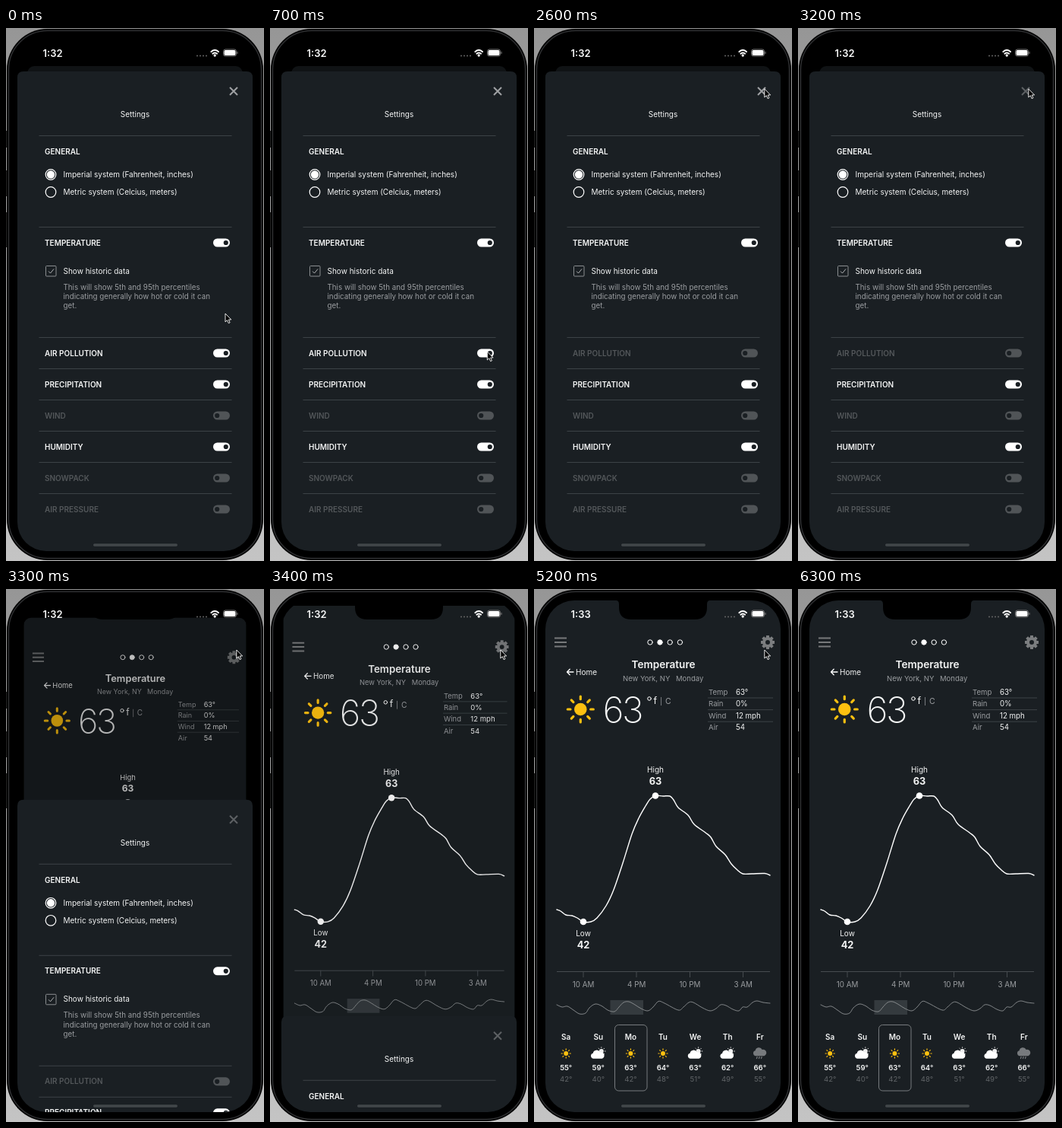
Write an HTML page that moves like this. It is 340 px wide and 700 px high and loops after 6700 ms.

```html
<!DOCTYPE html>
<html lang="en">
<head>
<meta charset="utf-8">
<title>Weather settings</title>
<style>
  html, body { margin: 0; width: 100%; height: 100%; overflow: hidden; background: #aaa; }
  svg { display: block; width: 340px; height: 700px; }
  text { font: 400 10px Inter, "Open Sans", sans-serif; fill: #f4f5f5; }
  .bold { font-weight: 700; }
  .semi { font-weight: 600; }
  .mid { text-anchor: middle; }
  .grey { fill: #9a9da0; }
  .faint { fill: #606467; }
  .rule { stroke: #3c4246; }
  .line { fill: none; stroke: #fff; stroke-linejoin: round; stroke-linecap: round; }
  .panel { fill: #1a1f23; }
  .pill { fill: #fff; }
  .knob { fill: #1a1f23; }
  .off text { fill: #53575a; }
  .off .pill { fill: #505457; }
  .off .knob { transform: translateX(-11.6px); }
</style>
</head>
<body>
<svg viewBox="0 0 340 700">
  <defs>
    <linearGradient id="wall" x2="0" y2="1">
      <stop stop-color="#969696"/><stop offset="1" stop-color="#c4c4c4"/>
    </linearGradient>
    <clipPath id="screen"><rect x="15" y="15" width="310" height="672" rx="38"/></clipPath>
    <g id="sun" stroke="#fdc010" stroke-width="3.2" stroke-linecap="round"></g>
    <path id="cloud" d="M-5 5.2a3.2 3.2 0 0 1-.6-6.300a4.300 4.300 0 0 1 8.200-1.100a3.800 3.800 0 0 1 2.400 7.400z"/>
  </defs>
  <rect width="340" height="700" fill="url(#wall)"/>
  <path d="M.7 135v22M.7 187v34M.7 242v46" stroke="#222" stroke-width="2"/>
  <rect x="1" y="1" width="338" height="698" rx="54"/>
  <rect x="3.500" y="3.500" width="333" height="693" rx="51" fill="none" stroke="#2e2f31" stroke-width="1.500"/>

  <g clip-path="url(#screen)">
    <g id="main"></g>
    <rect id="shade" x="15" y="15" width="310" height="672"/>
    <g id="modal"></g>
    <path d="M108 15q4 0 4 5v4q0 16 16 16h84q16 0 16-16v-4q0-5 4-5z"/>
  </g>

  <text id="clock" class="semi" x="48.500" y="37.500" style="font-size:13px">1:32</text>
  <path d="M252 36.500h14" stroke="#666" stroke-width="2" stroke-linecap="round" stroke-dasharray="0 4"/>
  <g class="line" stroke-width="1.900">
    <path d="M270.300 31.200q4.900-4.400 9.800 0M272.300 33.700q2.900-2.600 5.800 0"/>
    <circle cx="275.200" cy="36" r=".7"/>
  </g>
  <rect x="286.500" y="28" width="17" height="9" rx="2.700" fill="none" stroke="#777"/>
  <rect x="287.500" y="29" width="15" height="7" rx="1.800" fill="#fff"/>
  <path d="M305 31v3" stroke="#777"/>
  <rect x="115" y="677.300" width="111" height="3.500" rx="1.700" fill="#42474a"/>

  <circle id="touch" r="16.500" fill="#aaa" fill-opacity=".4"/>
  <path id="cursor" d="M0 0V11L2.500 8.700 4.300 12.700 6.100 11.900 4.400 8H7.800Z" fill="#000" stroke="#fff" stroke-width=".9" stroke-linejoin="round"/>
</svg>
<script>
const $ = id => document.getElementById(id);
const text = (x, y, s, cls = '', size = 10) =>
  `<text x="${x}" y="${y}" class="${cls}" style="font-size:${size}px">${s}</text>`;
const rule = (y, x1 = 43.5, x2 = 297.5) => `<path class="rule" d="M${x1} ${y}H${x2}"/>`;
const use = (id, x, y, scale, fill = '') =>
  `<use href="#${id}" fill="${fill}" transform="translate(${x} ${y}) scale(${scale})"/>`;
const spokes = (n, r1, r2) => Array.from({ length: n }, (_, i) => {
  const c = Math.cos(i * 2 * Math.PI / n), s = Math.sin(i * 2 * Math.PI / n);
  return `M${c * r1} ${s * r1}L${c * r2} ${s * r2}`;
}).join('');

// Catmull-Rom spline through a flat list of x, y values
function curve(v) {
  const n = v.length / 2;
  const at = i => { i = Math.max(0, Math.min(n - 1, i)); return [v[2 * i], v[2 * i + 1]]; };
  let d = `M${at(0)}`;
  for (let i = 0; i < n - 1; i++) {
    const [a, b, c, e] = [at(i - 1), at(i), at(i + 1), at(i + 2)];
    d += `C${b.map((p, k) => p + (c[k] - a[k]) / 6)} ${c.map((p, k) => p - (e[k] - b[k]) / 6)} ${c}`;
  }
  return d;
}

$('sun').innerHTML = `<circle r="8.300" fill="#fdc010" stroke="none"/><path d="${spokes(8, 13.3, 17)}"/>`;

// Settings sheet
const section = (name, y, on, id = '') => `<g id="${id}" class="${on ? '' : 'off'}">
  ${text(51, y + 3.6, name, 'semi')}
  <rect class="pill" x="273" y="${y - 5.5}" width="22" height="11" rx="5.500"/>
  <circle class="knob" cx="289.800" cy="${y}" r="3.100"/></g>`;

$('modal').innerHTML = `
  <path class="panel" d="M15 760V65q0-8 8-8H317q8 0 8 8V760z"/>
  <path id="close" d="M295 78l10 10m0-10l-10 10" stroke="#9fa1a3" stroke-width="2"/>
  ${text(170, 117, 'Settings', 'mid')}
  ${[141.5, 261.5, 406.5, 447.5, 488.5, 529.5, 570.5, 611.5].map(y => rule(y)).join('')}
  ${text(51, 166, 'GENERAL', 'semi')}
  <g class="line" stroke-width="1.200">
    <circle cx="59" cy="192.500" r="6.800"/><circle cx="59" cy="215.500" r="6.800"/>
  </g>
  <circle cx="59" cy="192.500" r="5.200" fill="#fff"/>
  ${text(75.5, 196.1, 'Imperial system (Fahrenheit, inches)')}
  ${text(75.5, 219.1, 'Metric system (Celcius, meters)')}
  <g fill="none" stroke="#8b8e91">
    <rect x="52.500" y="312.500" width="13.500" height="13.500" rx="1"/>
    <path d="M56 319.500l2.500 2.500 4.500-5.500" stroke="#b0b2b4"/>
  </g>
  ${text(75.5, 322.6, 'Show historic data')}
  ${['This will show 5th and 95th percentiles', 'indicating generally how hot or cold it can', 'get.']
    .map((s, i) => text(75.5, 343.7 + 12.2 * i, s, 'grey', 9.8)).join('')}
  ${section('TEMPERATURE', 282, true)}
  ${section('AIR POLLUTION', 427, true, 'pollution')}
  ${section('PRECIPITATION', 468, true)}
  ${section('WIND', 509, false)}
  ${section('HUMIDITY', 550, true)}
  ${section('SNOWPACK', 591, false)}
  ${section('AIR PRESSURE', 632, false)}`;

// Weather screen
const temps = [30, 421, 35, 423, 42, 428, 50, 429, 57, 432, 65, 437, 75, 437, 83, 432, 95, 416, 105, 395,
  117, 360, 129, 322, 138, 301, 147, 285, 153, 276, 160, 271.5, 170, 272, 179, 272, 184, 277, 190, 287,
  203, 297, 211, 309, 226, 320, 233, 326, 240, 338, 252, 349, 260, 361, 268, 369, 275, 374, 287, 374,
  304, 373.5, 311, 376];
const week = [30, 546, 37, 549, 44, 548, 52, 553, 60, 558, 68, 557, 73, 550, 81, 545, 90, 548, 97, 553,
  106, 555, 112, 549, 118, 543, 125, 542, 133, 546, 141, 551, 150, 554, 157, 549, 164, 541.5, 172, 544,
  190, 553, 197, 549, 204, 543, 210, 543, 222, 550, 232, 554, 240, 551, 246, 546, 253, 547, 262, 552,
  270, 554, 275, 549, 281, 549, 288, 543, 294, 541, 302, 543, 311, 544];

const icons = {
  sun: x => use('sun', x, 610, .36),
  cloudy: x => `<g style="--c:#fff">${`<circle cx="${x + 4}" cy="607" r="3" fill="#eee"/>
    <path transform="translate(${x + 4} 607)" d="${spokes(8, 4.2, 5.6)}" stroke="#eee"/>`}
    ${use('cloud', x - .8, 611, 1.12, '#fff')}</g>`,
  rain: x => use('cloud', x, 607.5, 1.1, '#777a7d') +
    `<path d="M${x - 3.5} 614l-1 3m4-3l-1 3m4-3l-1 3m-1-1" stroke="#777a7d" stroke-width="1.200"/>`
};
const days = [['Sa', 'sun', 55, 42], ['Su', 'cloudy', 59, 40], ['Mo', 'sun', 63, 42], ['Tu', 'sun', 64, 48],
  ['We', 'cloudy', 63, 51], ['Th', 'cloudy', 62, 49], ['Fr', 'rain', 66, 55]];
const day = ([name, icon, high, low], i) => {
  const x = 42.2 + 42.6 * i;
  return text(x, 592.2, name, 'semi mid') + icons[icon](x) +
    text(x, 631.6, high + '°', 'semi mid', 9.6) + text(x, 646.6, low + '°', 'faint mid', 9.6);
};
const facts = [['Temp', '63°'], ['Rain', '0%'], ['Wind', '12 mph'], ['Air', '54']];

$('main').innerHTML = `
  <rect class="panel" x="15" y="15" width="310" height="672" rx="10"/>
  <path d="M27 64.500h16M27 70h16M27 75.500h16" stroke="#77797b" stroke-width="2"/>
  <g class="line">${[153, 166, 179.2, 192.4].map((x, i) =>
    `<circle cx="${x}" cy="70" r="3.200" fill="${i == 1 ? '#fff' : 'none'}"/>`).join('')}</g>
  <g transform="translate(308 70)" fill="none" stroke="#7b7d7f" stroke-width="4">
    <circle r="5"/><path d="${spokes(8, 5.5, 9)}"/>
  </g>
  <path class="line" d="M52 109h-8.500m3.700-3.700l-3.700 3.700 3.700 3.700" stroke-width="1.300"/>
  ${text(55, 112.6, 'Home')}
  ${text(170.5, 104.3, 'Temperature', 'semi mid', 13.6)}
  ${text(117, 120.6, 'New York, NY', 'grey', 9.5)}
  ${text(187, 120.6, 'Monday', 'grey', 9.5)}
  ${use('sun', 61.3, 158, 1)}
  <g style="letter-spacing:-2px"><text x="90.500" y="176" style="font-size:48px;font-weight:200;letter-spacing:-2.500px">63</text></g>
  <circle class="line" cx="152" cy="144" r="2.300"/>
  ${text(157.5, 150.5, 'f', '', 12.5)}
  <path d="M167.500 142v11" stroke="#777a7d"/>
  ${text(173, 151, 'C', 'grey', 10.5)}
  ${facts.map(([label, value], i) => {
    const y = 138.6 + 15.6 * i;
    return text(230, y, label, 'grey', 9.6) + text(266, y, value, '', 9.7) + (i < 3 ? rule(y + 4.4, 229, 315) : '');
  }).join('')}
  <path class="line" d="${curve(temps)}" stroke-width="1.400"/>
  <g fill="#fff"><circle cx="160" cy="271.500" r="4.300"/><circle cx="65" cy="437" r="4.300"/></g>
  ${text(160, 240.6, 'High', 'mid')}${text(160, 256.8, '63', 'bold mid', 12.8)}
  ${text(65, 455.6, 'Low', 'mid')}${text(65, 471.6, '42', 'bold mid', 12.8)}
  <path d="M30 502.500H311M65 502v8M135 502v8M205.500 502v8M275.500 502v8" stroke="#474c50" fill="none"/>
  ${['10 AM', '4 PM', '10 PM', '3 AM'].map((s, i) => text(65 + 70.2 * i, 523.1, s, 'grey mid', 9.8)).join('')}
  <rect x="100.500" y="540" width="43.500" height="19" fill="#343a3e"/>
  <path class="line" d="${curve(week)}" style="stroke:#8e9194" stroke-width=".9"/>
  <rect x="106.500" y="572.500" width="42.500" height="86.500" rx="5" fill="none" stroke="#777b7e"/>
  ${days.map(day).join('')}`;

// Motion
const LOOP = 6700, STEP = 100;
const clamp = v => Math.max(0, Math.min(1, v));
const ease = v => v < .5 ? 4 * v ** 3 : 1 - (2 - 2 * v) ** 3 / 2;
const path = [[0, 700, 289, 375], [1800, 2600, 286.3, 425], [0, 0, 303.8, 80]];

function pointer(t) {
  const i = t < path[1][0] ? 0 : 1, [start, end, x, y] = path[i], next = path[i + 1];
  const k = ease(clamp((t - start) / (end - start)));
  return [x + (next[2] - x) * k, y + (next[3] - y) * k];
}

// Critically damped spring: 1 while the sheet is open, 0 when dismissed
function openness(t) {
  const s = Math.max(0, t - 3230) * .0176;
  return (1 + s) * Math.exp(-s);
}

function draw(t) {
  const open = openness(t), scale = 1 - .085 * open;
  $('main').setAttribute('transform', `translate(${170 * (1 - scale)} ${36.3 * open}) scale(${scale})`);
  $('shade').setAttribute('opacity', .4 * open);
  $('modal').setAttribute('transform', `translate(0 ${630 * (1 - open)})`);
  $('pollution').setAttribute('class', t < 1500 ? '' : 'off');
  $('close').setAttribute('opacity', 1 - .5 * clamp((t - 2700) / 200));
  $('clock').textContent = t < 3800 ? '1:32' : '1:33';

  const move = `translate(${pointer(t)})`;
  const touching = t >= 1300 && t < 1500 || t >= 2800 && t < 3200;
  $('cursor').setAttribute('transform', move);
  $('cursor').setAttribute('opacity', 1 - clamp((t - 5200) / 400));
  $('touch').setAttribute('transform', move);
  $('touch').setAttribute('opacity', touching ? 1 : 0);
}

const begin = performance.now();
function tick() {
  const t = (performance.now() - begin) % LOOP;
  draw(Math.floor(t / STEP) * STEP);
  requestAnimationFrame(tick);
}
tick();
</script>
</body>
</html>
```
